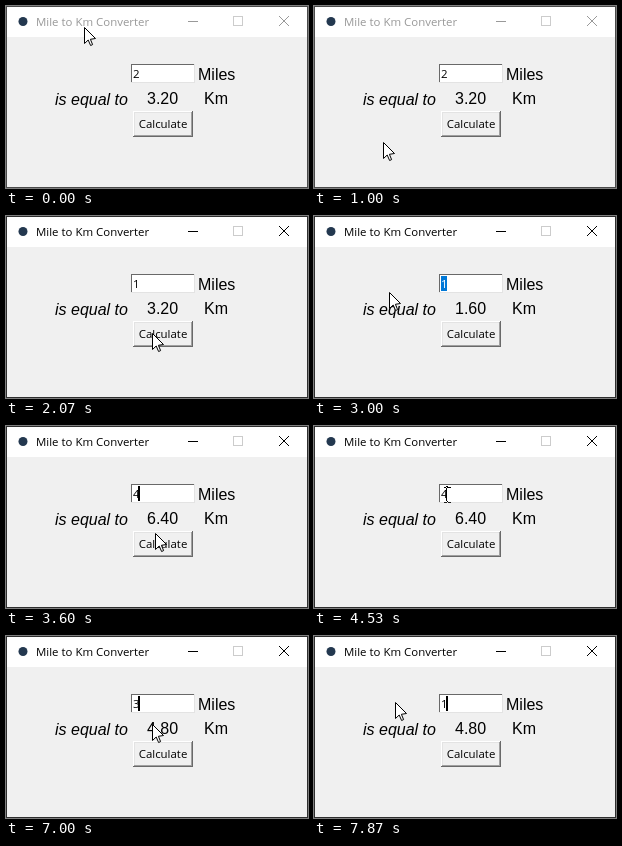
These frames come from a looping animation (302 by 182 pixels, 8000 ms). An HTML page with a canvas:

```html
<!DOCTYPE html>
<html lang="en">
<head>
<meta charset="utf-8">
<title>Mile to Km Converter</title>
<style>
html, body { margin: 0; width: 100%; height: 100%; overflow: hidden; background: #f0f0f0; }
canvas { display: block; width: 302px; height: 182px; }
</style>
</head>
<body>
<canvas id="stage" width="302" height="182"></canvas>
<script>
const ctx = document.getElementById('stage').getContext('2d', { alpha: false });
const LOOP = 8000, STEP = 1000 / 15;
const UI = '11.45px "Open Sans", "Noto Sans", sans-serif';
const LABEL = '16px "Liberation Sans", Arial, sans-serif';
const ARROW = [[.5, .5], [.5, 16.5], [4.2, 13], [6.6, 18.5], [8.6, 17.6], [6.4, 12.3], [11.5, 11.5]];

// time, x, y, shape (a = arrow, i = text beam)
const path = [
  [0, 78, 21, 'a'], [67, 78, 21, 'a'], [133, 84, 49, 'a'], [200, 84, 49, 'a'],
  [333, 88, 90, 'a'], [467, 90, 132, 'a'], [600, 88, 145, 'a'], [733, 88, 145, 'a'],
  [1000, 69, 136, 'a'], [1133, 78, 122, 'a'], [1267, 120, 84, 'a'], [1333, 143, 72, 'i'],
  [1467, 146, 69, 'i'], [1600, 76, 69, 'a'], [1667, 68, 70, 'a'], [1800, 92, 108, 'a'],
  [1933, 134, 138, 'a'], [2067, 146, 117, 'a'], [2400, 146, 117, 'a'], [2533, 147, 85, 'a'],
  [2600, 152, 72, 'i'], [2667, 154, 71, 'i'], [2800, 154, 71, 'i'], [2933, 90, 74, 'i'],
  [3000, 75, 76, 'a'], [3067, 66, 78, 'a'], [3200, 130, 112, 'a'], [3267, 146, 119, 'a'],
  [3333, 146, 119, 'a'], [3400, 146, 117, 'a'], [3533, 146, 117, 'a'], [3733, 154, 88, 'a'],
  [3800, 162, 73, 'i'], [4000, 158, 70, 'i'], [4133, 153, 72, 'i'], [4267, 153, 72, 'i'],
  [4333, 154, 72, 'i'], [4467, 154, 72, 'i'], [4533, 133, 69, 'i'], [4733, 88, 70, 'i'],
  [4800, 77, 68, 'a'], [4867, 75, 68, 'a'], [5333, 75, 68, 'a'], [5400, 75, 70, 'a'],
  [5533, 75, 70, 'a'], [5733, 108, 98, 'a'], [5933, 146, 119, 'a'], [6800, 146, 119, 'a'],
  [7000, 146, 88, 'a'], [7067, 150, 73, 'i'], [7133, 151, 70, 'i'], [7333, 151, 70, 'i'],
  [7533, 92, 64, 'i'], [7600, 78, 65, 'a'], [7667, 75, 66, 'a'], [7800, 75, 66, 'a'],
  [7867, 81, 66, 'a'], [8000, 81, 66, 'a']
];
const entry = [[0, '2'], [1733, '1'], [3067, '4'], [5400, '3'], [7800, '1']];
const result = [[0, '3.20'], [2267, '1.60'], [3400, '6.40'], [6267, '4.80']];
const selected = [[1533, 1733], [2933, 3067], [4667, 5400], [7467, 7800]];
const pressed = [[2200, 2267], [3333, 3400], [6200, 6267]];
const FOCUS = 1432;

const valueAt = (list, t) => list.filter(s => s[0] <= t + 1).pop()[1];
const within = (list, t) => list.some(([a, b]) => t + 1 >= a && t + 1 < b);

function rect(color, x, y, w, h) {
  ctx.fillStyle = color;
  ctx.fillRect(x, y, w, h);
}

function text(str, x, y, font, color = '#000', align = 'left') {
  ctx.font = font;
  ctx.textAlign = align;
  ctx.fillStyle = color;
  ctx.fillText(str, x, y);
}

function bevel(x, y, w, h, light, dark) {
  rect(dark, x, y, w, h);
  rect(light, x, y, w - 1, 1);
  rect(light, x, y, 1, h - 1);
}

function line(color, ...points) {
  ctx.strokeStyle = color;
  ctx.lineWidth = 1;
  ctx.beginPath();
  points.forEach(([x, y], i) => i % 2 ? ctx.lineTo(x, y) : ctx.moveTo(x, y));
  ctx.stroke();
}

function drawWindow(active) {
  const ink = active ? '#000' : '#999';
  rect(active ? '#2e2e2e' : '#4a4a4a', 0, 0, 302, 182);
  rect('#fff', 1, 1, 300, 30);
  rect('#f0f0f0', 1, 31, 300, 150);
  ctx.fillStyle = '#23384f';
  ctx.beginPath();
  ctx.arc(17, 15.5, 4.5, 0, 7);
  ctx.fill();
  text('Mile to Km Converter', 30, 20, UI, ink);
  rect(ink, 182, 15, 10, 1);
  ctx.strokeStyle = '#ccc';
  ctx.lineWidth = 1;
  ctx.strokeRect(227.5, 10.5, 9, 9);
  line(ink, [273, 10], [283, 20], [283, 10], [273, 20]);
}

function drawEntry(t) {
  const isSelected = within(selected, t);
  bevel(125, 58, 64, 19, '#696969', '#e3e3e3');
  rect('#fff', 126, 59, 62, 17);
  if (isSelected) rect('#0078d7', 127, 60, 6, 15);
  if (t >= FOCUS && (t - FOCUS) % 900 < 600) rect('#000', isSelected ? 126 : 132, 60, 2, 15);
  text(valueAt(entry, t), 127, 72, UI, isSelected ? '#fff' : '#000');
}

function drawButton(down) {
  const shift = down ? 1 : 0;
  if (down) {
    bevel(127, 105, 60, 26, '#a0a0a0', '#fff');
    bevel(128, 106, 58, 24, '#696969', '#e3e3e3');
  } else {
    bevel(127, 105, 60, 26, '#fff', '#696969');
    bevel(128, 106, 58, 24, '#e3e3e3', '#a0a0a0');
  }
  rect('#f0f0f0', 129, 107, 56, 22);
  text('Calculate', 157 + shift, 122 + shift, UI, '#000', 'center');
}

// the text beam inverts whatever lies under it
function drawBeam(x, y) {
  ctx.globalCompositeOperation = 'difference';
  rect('#fff', x, y - 7, 1, 14);
  for (const edge of [y - 8, y + 7]) {
    rect('#fff', x - 3, edge, 3, 1);
    rect('#fff', x + 1, edge, 3, 1);
  }
  ctx.globalCompositeOperation = 'source-over';
}

function drawArrow(x, y) {
  ctx.beginPath();
  ARROW.forEach(([dx, dy]) => ctx.lineTo(x + dx, y + dy));
  ctx.closePath();
  ctx.fillStyle = '#fff';
  ctx.fill();
  ctx.strokeStyle = '#000';
  ctx.lineWidth = 1;
  ctx.stroke();
}

function drawPointer(t) {
  const i = Math.max(1, path.findIndex(k => k[0] > t + 1));
  const [t0, x0, y0, shape] = path[i - 1], [t1, x1, y1] = path[i];
  const p = Math.max(0, (t - t0) / (t1 - t0));
  const x = Math.round(x0 + (x1 - x0) * p), y = Math.round(y0 + (y1 - y0) * p);
  (shape === 'i' ? drawBeam : drawArrow)(x, y);
}

function draw(ms) {
  // the screen refreshes fifteen times a second
  const t = Math.floor((ms % LOOP + 4) / STEP) * STEP;
  drawWindow(t >= FOCUS);
  drawEntry(t);
  text('Miles', 192, 74, LABEL);
  text('is equal to', 49, 99, 'italic ' + LABEL);
  text(valueAt(result, t), 141, 98, LABEL);
  text('Km', 198, 98, LABEL);
  drawButton(within(pressed, t));
  drawPointer(t);
}

const start = performance.now();
function tick() {
  draw(performance.now() - start);
  requestAnimationFrame(tick);
}
tick();
</script>
</body>
</html>
```
